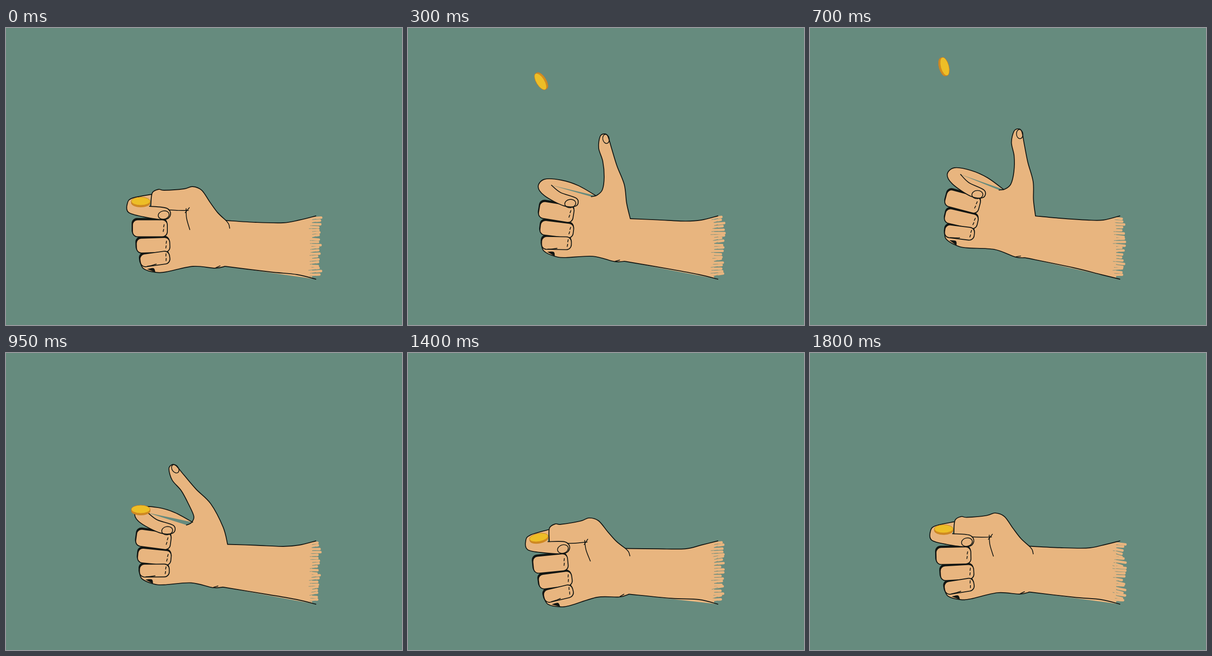
Recreate the animation shown at these times as an HTML page with a canvas. Size 864 by 648 pixels, loop 1.85 s.

```html
<!DOCTYPE html>
<html lang="en">
<head>
<meta charset="utf-8">
<title>Coin flip</title>
<style>
html, body { margin: 0; width: 100%; height: 100%; overflow: hidden; background: #668b7e; }
canvas { display: block; }
</style>
</head>
<body>
<canvas id="stage" width="864" height="648"></canvas>
<script>
const ctx = document.getElementById('stage').getContext('2d');
const BG = '#668b7e', SKIN = '#e8b57f', INK = '#121613';
const STEP = 50, FRAMES = 37;
const PIVOT = [545, 480], THUMB_BASE = [420, 392];
const OPEN_TILT = 9; // hand angle at which the open hand's points are given

const points = (...n) => n.flatMap((v, i) => i % 2 ? [] : [[v, n[i + 1]]]);
const clamp = v => Math.max(0, Math.min(1, v));
const lerp = (a, b, k) => a + (b - a) * k;
const ease = k => (1 - Math.cos(Math.PI * clamp(k))) / 2;
const rad = deg => deg * Math.PI / 180;
const random = n => { const v = Math.sin(n * 12.9898 + 4.1) * 43758.5453; return v - Math.floor(v); };

// Outlines of the hand; everything else follows from its angle.
const knuckle = points(480, 420, 462, 403, 445, 380, 427, 354, 407, 346, 388, 351, 345, 354, 333, 352, 319, 360, 316, 388);
const thumb = points(485, 416, 477, 382, 472, 342, 456, 301, 444, 262, 436, 236, 428, 231, 419, 237,
  416, 262, 425, 291, 428, 325, 424, 353, 412, 365, 400, 368);
const heel = points(292, 508, 300, 525, 326, 533, 350, 532, 408, 520, 456, 524, 478, 520);
const curled = points(317, 363, 276, 371, 265, 382, 267, 402, 300, 412, 345, 418, 359, 407, 350, 393, 313, 389);
const raised = points(410, 366, 372, 344, 335, 332, 298, 330, 284, 346, 298, 366, 340, 388, 367, 388, 368, 372, 333, 359, 313, 343);
// Middle, ring and little finger: centre, size, tilt.
const fingers = [[314, 437, 76, 37, 0], [321, 474, 73, 32, -2], [325, 504, 65, 28, -8]];

// Hand angle in degrees at turning points, eased between them.
const swing = [[0, 0], [2, -8], [4, 7], [10, 15], [14, 15], [19, 7.6], [22, -6], [24.5, -12],
  [28, -5.5], [31, .5], [34, -1.3], [36, -1.3], [37, 0]];

function angleAt(t) {
  const i = swing.findIndex(k => k[0] > t);
  const [t0, a] = swing[i - 1], [t1, b] = swing[i];
  return lerp(a, b, ease((t - t0) / (t1 - t0)));
}

function rotate([x, y], [cx, cy], deg) {
  const c = Math.cos(rad(deg)), s = Math.sin(rad(deg));
  return [cx + (x - cx) * c - (y - cy) * s, cy + (x - cx) * s + (y - cy) * c];
}

// The thumb bends more towards its tip.
const bendThumb = (p, bend) => rotate(p, THUMB_BASE, -22 * bend * clamp((390 - p[1]) / 50));

// Smooth curve through the points.
function curve(pts) {
  const path = new Path2D(), n = pts.length - 1;
  path.moveTo(...pts[0]);
  for (let i = 0; i < n; i++) {
    const [a, b, c, d] = [pts[Math.max(0, i - 1)], pts[i], pts[i + 1], pts[Math.min(n, i + 2)]];
    path.bezierCurveTo(b[0] + (c[0] - a[0]) / 6, b[1] + (c[1] - a[1]) / 6,
      c[0] - (d[0] - b[0]) / 6, c[1] - (d[1] - b[1]) / 6, ...c);
  }
  return path;
}

function paint(path, fill, stroke, width = 1.9) {
  if (fill) { ctx.fillStyle = fill; ctx.fill(path); }
  if (stroke) { ctx.strokeStyle = stroke; ctx.lineWidth = width; ctx.stroke(path); }
}

const ink = (...n) => paint(curve(points(...n)), null, INK, 1.7);

function fillWith(pts, ...corners) {
  const path = curve(pts);
  for (const p of corners) path.lineTo(...p);
  paint(path, SKIN);
}

function oval(x, y, rx, ry, deg, fill, stroke, width) {
  const path = new Path2D();
  path.ellipse(x, y, rx, ry, rad(deg), 0, 7);
  paint(path, fill, stroke, width);
}

function turned([x, y], deg, paintPart) {
  ctx.save();
  ctx.translate(x, y);
  ctx.rotate(rad(deg));
  ctx.translate(-x, -y);
  paintPart();
  ctx.restore();
}

function drawArm(t, angle, wrist) {
  const top = [[676, 410], [640, 419], [605, 425 - angle * .4], [545, 424 - angle * .6], wrist];
  const bottom = [rotate([478, 520], PIVOT, angle), [575, 532 - angle * .6], [635, 538], [676, 548]];
  const path = curve(top);
  path.lineTo(...bottom[0]);
  path.addPath(curve(bottom));
  const body = curve([...bottom].reverse());
  // One closed fill: along the top, then back along the bottom.
  fillWith(top, ...bottom.slice(0, 3), [668, 545], [668, 413]);
  paint(body, SKIN);
  for (let y = 415, i = t * 31; y < 544; y += 6.5, i++) {
    const slant = (random(t + 5) - .5) * 6 + (random(i) - .5) * 4;
    const tip = 677 + random(t + 1) * 5 + random(i + 7) * 9;
    paint(curve([[666, y], [tip, y + slant]]), null, SKIN, 5.4);
    paint(curve([[660 + random(i + 3) * 12, y + 3.2], [676, y + 3.2 + slant]]), null, BG, .9);
  }
  paint(curve(top), null, INK);
  paint(curve(bottom), null, INK);
}

function drawFingers() {
  const box = ([x, y, w, h], dx = 0, dy = 0) => {
    const path = new Path2D();
    path.roundRect(x - w / 2 + dx, y - h / 2 + dy, w, h, 11);
    return path;
  };
  const each = paintFinger => fingers.forEach(f => turned(f, f[4], () => paintFinger(f)));
  each(f => paint(box(f, -1, -3), INK, INK));
  each(f => {
    paint(box(f), SKIN, INK);
    const x = f[0] + f[2] / 2 - 8, y = f[1];
    ink(x + 1, y - 8, x, y - 3);
    ink(x, y + 2, x - 1, y + 7);
  });
}

function drawHand(t, angle, open, bend) {
  const tilt = open ? angle - OPEN_TILT : angle;
  const edge = open ? thumb.map(p => bendThumb(p, bend)) : knuckle;
  const index = open ? raised : curled;
  drawArm(t, angle, rotate(edge[0], PIVOT, tilt));

  turned(PIVOT, tilt, () => fillWith(edge, index.at(-1), [320, 480], [490, 480]));
  turned(PIVOT, angle, () => {
    fillWith(heel, [500, 500], [490, 440], [360, 440]);
    paint(curve(heel), null, INK);
    drawFingers();
    ink(458, 523, 467, 519);
    ink(308, 520, 318, 518, 328, 515);
    paint(curve(points(308, 526, 322, 524, 326, 533)), INK);
  });
  turned(PIVOT, tilt, () => {
    paint(curve(index), SKIN, INK);
    paint(curve(edge), null, INK);
    if (open) {
      oval(354, 383, 12, 9, -8, null, INK, 1.6);
      const [x, y] = bendThumb([432, 242], bend);
      oval(x, y, 7, 10, -12 - 22 * bend, null, INK, 1.6);
    } else {
      oval(344, 408, 12, 9, -12, null, INK, 1.6);
      ink(480, 420, 486, 428, 488, 437);
      ink(355, 397, 376, 398, 398, 398);
      ink(393, 394, 394, 415, 401, 440);
      ink(391, 403, 395, 398, 400, 392);
    }
  });
}

function drawCoin(t, angle, open) {
  let [x, y] = rotate([294, 378], PIVOT, angle), deg = -.35 * angle * angle;
  if (open) {
    const glide = (t - 6) / 8;
    x = lerp(289, 294, clamp(glide));
    y = 62 + (t < 11.5 ? .06 * (11.5 - t) ** 4 : 279 * ((t - 11.5) / 7.5) ** 2.31);
    deg = t < 6 ? -122 * (t - 3) / 3 : t < 14 ? lerp(-122, -285, glide) : lerp(-285, -360, (t - 14) / 5);
  }
  for (const [depth, color] of [[3.6, '#dc9a26'], [1.8, '#dc9a26'], [0, '#edbe27']])
    oval(x - Math.sin(rad(deg)) * depth, y + Math.cos(rad(deg)) * depth, 20.5, 9, deg, color, '#c67c20', 1);
}

function draw(t) {
  const angle = angleAt(t), open = t >= 4 && t < 20;
  const bend = t < 10 ? clamp((6 - t) / 2) : ease((t - 14) / 5);
  ctx.fillStyle = BG;
  ctx.fillRect(0, 0, 864, 648);
  drawHand(t, angle, open, bend);
  drawCoin(t, angle, open);
}

ctx.lineCap = ctx.lineJoin = 'round';

function tick() {
  draw(Math.floor(performance.now() / STEP) % FRAMES);
  requestAnimationFrame(tick);
}
tick();
</script>
</body>
</html>
```
